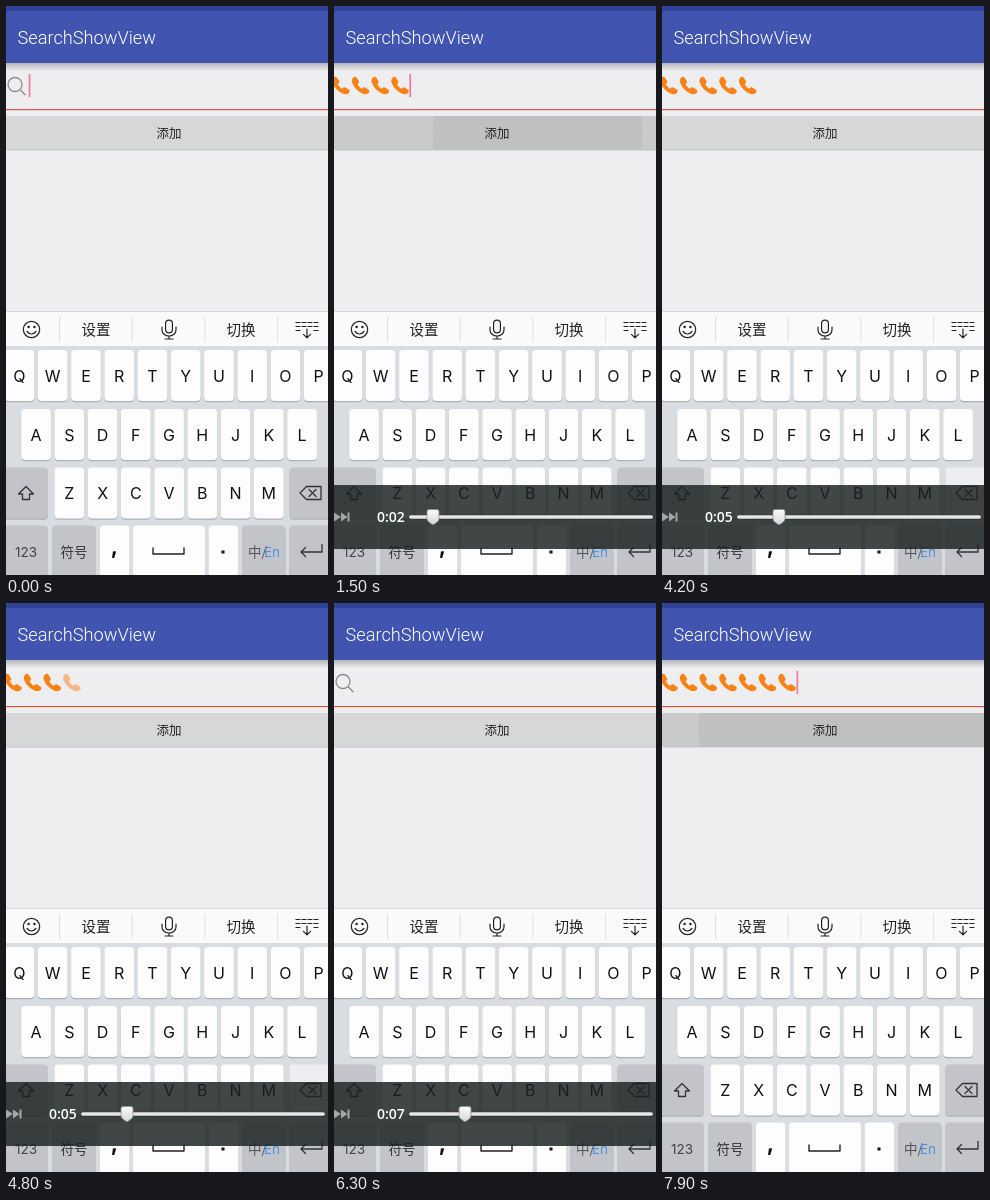
Animation, 322 px wide and 569 px high, one loop 8 s. Source, as an HTML page with a canvas:

```html
<!DOCTYPE html>
<html lang="zh">
<head>
<meta charset="utf-8">
<title>SearchShowView</title>
<style>
html, body { margin: 0; width: 100%; height: 100%; overflow: hidden; background: #eeeef0; }
canvas { display: block; width: 322px; height: 569px; }
</style>
</head>
<body>
<canvas id="stage"></canvas>
<script>
const W = 322, H = 569, LOOP = 8000;
const canvas = document.getElementById('stage');
const ctx = canvas.getContext('2d');
const dpr = window.devicePixelRatio || 1;
canvas.width = W * dpr;
canvas.height = H * dpr;

const CJK = '"Noto Sans CJK SC", "Noto Sans CJK", sans-serif';
const PITCH = 33.25, KEY_W = 29.7, KEY_H = 51;
const ICON_PITCH = 19.7;

// Taps on the button; each one adds an icon shortly afterwards.
const TAPS = [500, 750, 980, 1190, 1400, 1900, 2150, 2400];
for (let i = 0; i < 7; i++) TAPS.push(6541 + 200 * i);
const ADD_DELAY = 120;

// Backspace runs in pairs: the first press dims an icon, the second removes it.
const DELETE_START = 3110, DELETE_STEP = 191.7, DELETE_COUNT = 16, HOLD = 90;

const handset = new Path2D('M1.5 1.8C2.6 .3 4.2 .1 5.3 1.5L7.3 4.6C8 5.9 7.5 6.8 6.2 7.7' +
  'C6.9 9.8 8.6 11.6 10.8 12.5C11.6 11 12.6 10.6 13.8 11.3L17 13.2C18.5 14.2 18.2 15.7 16.9 16.9' +
  'C15.2 18.5 12.8 18.3 10 16.8C6 14.6 2.8 11.2 1 7.2C0 4.8 .3 3 1.5 1.8Z');

const clamp = v => Math.max(0, Math.min(1, v));

function rect(x, y, w, h, fill) {
  ctx.fillStyle = fill;
  ctx.fillRect(x, y, w, h);
}

function round(x, y, w, h, r, fill) {
  ctx.beginPath();
  ctx.roundRect(x, y, w, h, r);
  ctx.fillStyle = fill;
  ctx.fill();
}

function stroke(d, color, width = 1.2) {
  ctx.strokeStyle = color;
  ctx.lineWidth = width;
  ctx.stroke(new Path2D(d));
}

function text(s, x, y, font, color, align = 'center') {
  ctx.font = font;
  ctx.fillStyle = color;
  ctx.textAlign = align;
  ctx.fillText(s, x, y);
}

function gradient(y0, y1, from, to) {
  const g = ctx.createLinearGradient(0, y0, 0, y1);
  g.addColorStop(0, from);
  g.addColorStop(1, to);
  return g;
}

function key(x, y, w, fill = '#fdfdfe') {
  round(x, y + 1.3, w, KEY_H, 4, '#aeb1b6');
  round(x, y, w, KEY_H, 4, fill);
}

function letters(row, x, y) {
  [...row].forEach((c, i) => {
    const left = x + i * PITCH;
    key(left, y, KEY_W);
    text(c, left + KEY_W / 2, y + 31.5, '16px Inter, sans-serif', '#111');
  });
}

function drawHeader() {
  rect(0, 0, W, H, '#eeeef0');
  rect(0, 57, W, 8, gradient(57, 65, '#b4b5ba', '#eeeef0'));
  rect(0, 0, W, 57, '#4155b0');
  rect(0, 0, W, 5, '#33439b');
  text('SearchShowView', 11.5, 38, '300 18.2px Roboto, sans-serif', '#fff', 'left');
  rect(0, 103, W, 1.2, '#cf5a42');
}

function drawStrip() {
  rect(0, 305, W, 1, '#d4d5d8');
  rect(0, 306, W, 34, '#fafafb');
  for (let i = 0; i < 4; i++) rect(53 + i * 72.7, 311, 1, 25, '#dedfe1');
  const ink = '#222';
  stroke('M33.7 323.5a8.2 8.2 0 1 1-16.4 0a8.2 8.2 0 1 1 16.4 0M21 325.5q4.5 5 9 0', ink);
  for (const x of [22.6, 28.4]) {
    ctx.beginPath();
    ctx.arc(x, 321, 1.2, 0, 7);
    ctx.fillStyle = ink;
    ctx.fill();
  }
  text('设置', 90, 329, '14.5px ' + CJK, ink);
  text('切换', 235, 329, '14.5px ' + CJK, ink);
  stroke('M159.6 317.5a3.4 3.4 0 0 1 6.8 0v6a3.4 3.4 0 0 1-6.8 0zM156 321v3a7 6 0 0 0 14 0v-3' +
    'M163 330v3M159 333h8', ink);
  for (const y of [316.5, 320.5, 324.5]) {
    for (let i = 0; i < 4; i++) {
      if (y > 324 && (i === 1 || i === 2)) continue;
      stroke(`M${290 + i * 6} ${y}h4`, ink);
    }
  }
  stroke('M301 323v8.5M297.5 328.3l3.5 3.5l3.5-3.5', ink);
}

function drawKeys(deleting) {
  const gray = '#c2c4c9';
  rect(0, 340, W, H - 340, '#d9dce0');
  letters('QWERTYUIOP', -1.4, 344);
  letters('ASDFGHJKL', 15.2, 403);
  letters('ZXCVBNM', 48.5, 461.5);
  key(-4, 461.5, 46, gray);
  key(283.3, 461.5, 46, deleting ? '#eceef0' : gray);
  stroke('M20 480.5l-7.5 7.5h4v5.5h7v-5.5h4z', '#333', 1.3);
  stroke('M300.5 480.5h14.5v13h-14.5l-6.5-6.5zM303 483.5l7 7M310 483.5l-7 7', '#333', 1.3);

  const y = 519.5;
  key(-4, y, 46, gray);
  key(46, y, 44, gray);
  key(94, y, 29.5);
  key(127, y, 72);
  key(202.5, y, 29.7);
  key(236, y, 43.5, gray);
  key(283.3, y, 46, gray);
  text('123', 20, 551, '13.5px Inter, sans-serif', '#444');
  text('符号', 68, 551, '13.5px ' + CJK, '#333');
  text(',', 108.5, 548, 'bold 22px Inter, sans-serif', '#111');
  rect(215.5, 544.5, 3, 3, '#111');
  stroke('M147 542v6h31v-6', '#222', 1.4);
  text('中/', 242, 551, '13.5px ' + CJK, '#555', 'left');
  text('En', 258, 551, '13.5px Inter, sans-serif', '#4c93dc', 'left');
  stroke('M316 538.5v7.5h-21M299.5 541.5l-4.5 4.5l4.5 4.5', '#333', 1.3);
}

function drawButton(t) {
  round(0, 110.5, W + 4, 34, 2, '#c6c6c8');
  round(0, 110, W + 4, 33.5, 2, '#d6d7d7');
  const tap = TAPS.filter(s => s <= t).pop();
  const age = t - tap;
  if (age < 300) {
    const shade = 1 - clamp((age - 190) / 110);
    ctx.save();
    ctx.beginPath();
    ctx.roundRect(0, 110, W + 4, 33.5, 2);
    ctx.clip();
    ctx.globalAlpha = shade;
    rect(0, 110, W, 34, 'rgba(0,0,0,.06)');
    ctx.beginPath();
    ctx.arc(203.5, 127, age * 1.05, 0, 7);
    ctx.fillStyle = 'rgba(0,0,0,.05)';
    ctx.fill();
    ctx.restore();
  }
  text('添加', 163, 131.5, '12.5px ' + CJK, '#222');
}

function fieldState(t) {
  const added = TAPS.filter(s => s + ADD_DELAY <= t).length;
  const presses = Math.max(0, Math.min(DELETE_COUNT, Math.floor((t - DELETE_START) / DELETE_STEP) + 1));
  return { count: added - Math.floor(presses / 2), dim: presses % 2 === 1 };
}

function drawField(t) {
  const { count, dim } = fieldState(t);
  if (count === 0) stroke('M16 78.5a7 7 0 1 1-14 0a7 7 0 1 1 14 0M14 83.5l5 5.2', '#8d8d90', 1.3);
  for (let i = 0; i < count; i++) {
    ctx.save();
    ctx.translate(-2.3 + i * ICON_PITCH, 70.3);
    if (dim && i === count - 1) ctx.globalAlpha = 0.5;
    ctx.fillStyle = '#fa8214';
    ctx.fill(handset);
    ctx.restore();
  }
  if (t < 3020 || t >= 6541) {
    const x = count ? count * ICON_PITCH - 2.6 : 23.5;
    rect(x - 0.8, 68, 1.7, 23, '#f0789a');
  }
}

function isDeleting(t) {
  const u = t - DELETE_START + HOLD;
  return u >= 0 && u < DELETE_COUNT * DELETE_STEP && u % DELETE_STEP < HOLD;
}

function drawPlayer(t) {
  const alpha = Math.min(clamp((t - 50) / 250), clamp((7700 - t) / 250));
  if (alpha <= 0) return;
  ctx.save();
  ctx.globalAlpha = alpha;
  rect(0, 479, W, 64, 'rgba(28,34,33,.83)');
  ctx.fillStyle = '#a3a7a7';
  ctx.fill(new Path2D('M0 506.5l7 4.5l-7 4.5zM7 506.5l6.5 4.5l-6.5 4.5zM13.5 506.5h2v9h-2z'));
  const clock = t / 1000 + 1.05;
  text('0:0' + Math.floor(clock), 43, 516, '600 14px "Open Sans", sans-serif', '#fff', 'left');
  round(74.5, 508.7, 245, 4.8, 2.4, '#2b3030');
  round(75, 509.2, 244, 3.6, 1.8, '#e6e6e6');
  const x = Math.round(82 + 6.67 * clock);
  const knob = new Path2D(`M${x - 4} 503.5h8q2 0 2 2v7q0 2-1.5 3.2l-3 2.3q-1.5 1-3 0l-3-2.3` +
    `q-1.5-1.2-1.5-3.2v-7q0-2 2-2z`);
  ctx.fillStyle = gradient(503, 519, '#fbfbfb', '#d6d6d6');
  ctx.fill(knob);
  ctx.strokeStyle = '#8b8f8f';
  ctx.lineWidth = 0.8;
  ctx.stroke(knob);
  ctx.restore();
}

function frame(now) {
  const t = now % LOOP;
  ctx.setTransform(dpr, 0, 0, dpr, 0, 0);
  ctx.lineCap = 'round';
  ctx.lineJoin = 'round';
  drawHeader();
  drawButton(t);
  drawField(t);
  drawStrip();
  drawKeys(isDeleting(t));
  drawPlayer(t);
  requestAnimationFrame(start);
}

let origin = null;
function start(now) {
  if (origin === null) origin = now;
  frame(now - origin);
}
requestAnimationFrame(start);
</script>
</body>
</html>
```
